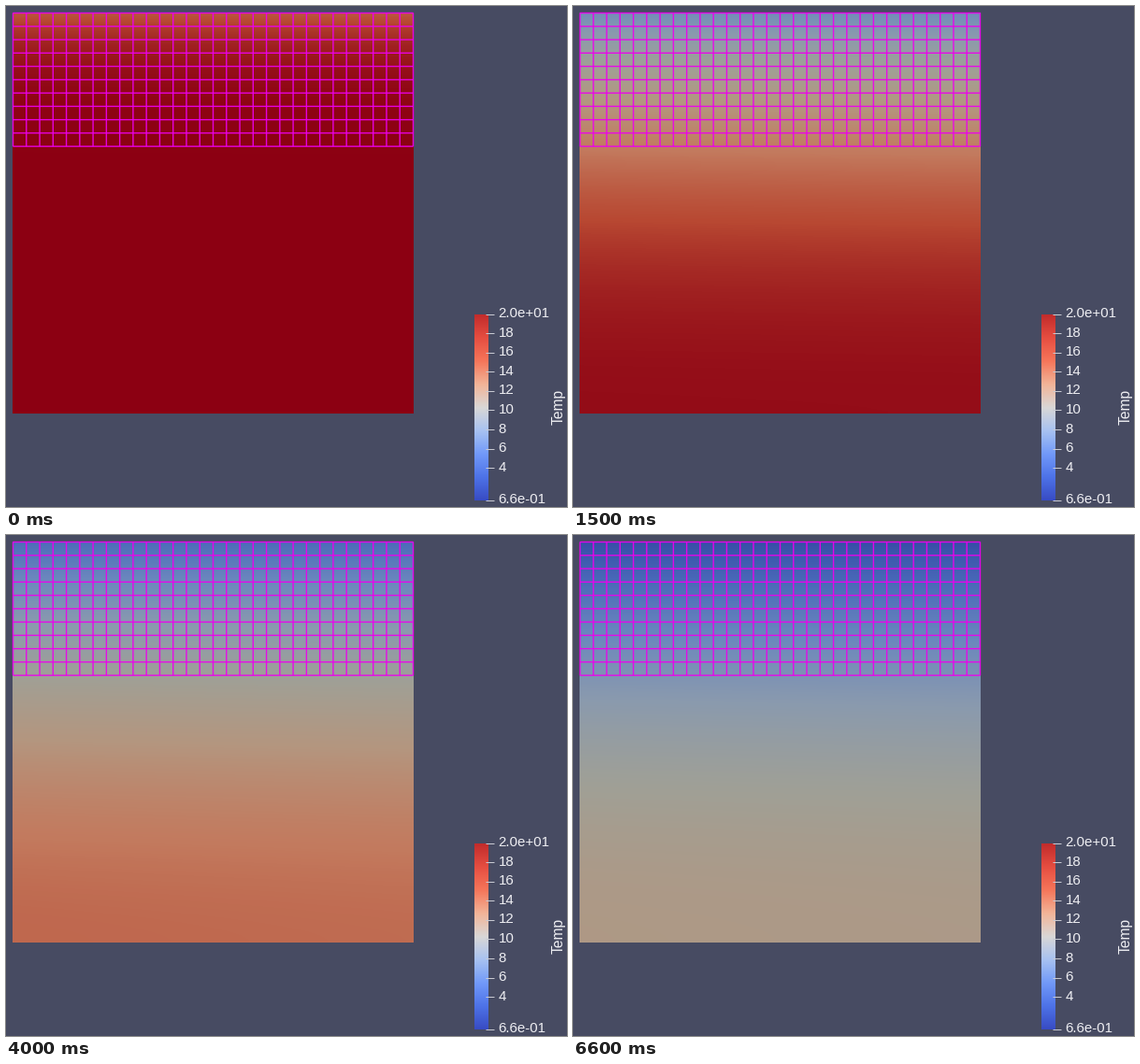
These frames come from a looping animation (600 px wide and 536 px high, 6.7 s). A matplotlib script:

```python
import numpy as np
import matplotlib.pyplot as plt
from matplotlib.animation import FuncAnimation
from matplotlib.collections import LineCollection
from matplotlib.colors import LinearSegmentedColormap

W, H, DPI = 600, 536, 100
FRAMES, STEP = 67, 100
PX = 72 / DPI
LEFT, TOP, SIDE = 7, 7, 429
WHITE = "#eeeef2"

# Evenly spaced stops; the lit surface is darker than the legend
surface = LinearSegmentedColormap.from_list("surface", [
    "#3044a0", "#4868b8", "#6a87be", "#8a9aae", "#a0a096",
    "#b4967f", "#c37a5e", "#b84832", "#8c0012"], N=512)
legend = LinearSegmentedColormap.from_list("legend", [
    "#384cc4", "#4e73e8", "#729af9", "#a8c2f1", "#d9d7d6",
    "#f2b498", "#f6765a", "#e64e41", "#c22c2c"], N=512)

# Heat conduction through a slab, cooled at the top, insulated below
CELLS = 90
DIFFUSIVITY = .062
COOLING = 7.5
DZ = 1 / CELLS


def ambient(t):
    return .1 - .03 * t + .45 * np.exp(-5 * t)


def solve_heat():
    """Normalised temperature by depth for every frame, implicit steps."""
    dt = STEP / 1000
    link = DIFFUSIVITY * dt / DZ ** 2
    loss = DIFFUSIVITY * dt * COOLING / (1 + COOLING * DZ / 2) / DZ
    off = np.eye(CELLS, k=1) + np.eye(CELLS, k=-1)
    system = np.eye(CELLS) + link * (np.diag(off.sum(axis=1)) - off)
    system[0, 0] += loss
    inverse = np.linalg.inv(system)
    u, states = np.ones(CELLS), []
    for i in range(FRAMES):
        source = u.copy()
        source[0] += loss * ambient(i * dt)
        u = inverse @ source
        states.append(u)
    return states


states = solve_heat()
depth = (np.arange(CELLS) + .5) * DZ
rows = (np.arange(SIDE) + .5) / SIDE
across = np.linspace(-.5, .5, SIDE)


def field(i):
    u = np.interp(rows, depth, states[i])[:, None]
    # The right side cools slightly faster
    u = u - .06 * u * (1 - u) * across
    return surface(np.clip(u, 0, 1))[..., :3]


fig = plt.figure(figsize=(W / DPI, H / DPI), dpi=DPI, facecolor="#474b62")
ax = fig.add_axes([0, 0, 1, 1])
ax.axis("off")

image = ax.imshow(field(0), extent=(LEFT, LEFT + SIDE, TOP + SIDE, TOP),
                  interpolation="nearest", aspect="auto")

# Mesh over the top third
COLS, ROWS = 30, 10
cell = (SIDE - 1) / COLS
xs = LEFT + .5 + cell * np.arange(COLS + 1)
ys = TOP + .5 + cell * np.arange(ROWS + 1)
mesh = [((x, ys[0]), (x, ys[-1])) for x in xs]
mesh += [((xs[0], y), (xs[-1], y)) for y in ys]
lines = LineCollection(mesh, colors="#ee00ee", linewidths=1.4 * PX, alpha=.92)
lines.set_snap(False)
ax.add_collection(lines)

# Legend
T_MIN, T_MAX = .66, 20
BAR_TOP, BAR_BOTTOM = 329.5, 528.5
ax.imshow(np.linspace(1, 0, 256)[:, None], cmap=legend, vmin=0, vmax=1,
          extent=(501, 515.5, BAR_BOTTOM + .5, BAR_TOP + .5), aspect="auto")


def label(x, y, s, size=15, angle=0):
    ax.text(x, y, s, color=WHITE, family="Liberation Sans",
            fontsize=size * PX, ha="left", va="baseline",
            rotation=angle, rotation_mode="anchor")


def tick(value, s):
    y = np.interp(value, [T_MIN, T_MAX], [BAR_BOTTOM, BAR_TOP])
    ax.plot([513, 522], [y, y], color="#c9cad2", lw=PX,
            solid_capstyle="butt")
    label(526.5, y + 3.6, s)


tick(T_MAX, "2.0e+01")
for value in range(18, 2, -2):
    tick(value, str(value))
tick(T_MIN, "6.6e-01")
label(596, 448.5, "Temp", size=15.6, angle=90)

ax.set_xlim(0, W)
ax.set_ylim(H, 0)


def update(i):
    image.set_data(field(i))
    return [image]


anim = FuncAnimation(fig, update, frames=FRAMES, interval=STEP,
                     repeat=True, repeat_delay=0)
plt.show()
```
